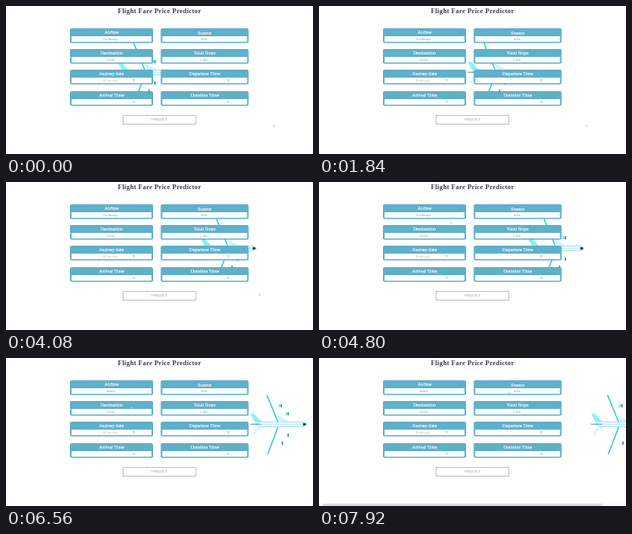
An HTML page for the animation above (8 s loop, 384 by 186 pixels).

```html
<!DOCTYPE html>
<html lang="en">
<head>
<meta charset="utf-8">
<title>Flight Fare Price Predictor</title>
<style>
  html, body { margin: 0; width: 100%; height: 100%; overflow: hidden; background: #fff; }
  svg { display: block; width: 384px; height: 186px; }
  text { text-anchor: middle; }
  .title { font: bold 8.2px "Liberation Serif", serif; letter-spacing: .36px; fill: #343b42; }
  .label { font: 6.1px "Liberation Serif", serif; fill: #fff; stroke: #fff; stroke-width: .15px; }
  .value { font: 3.3px "Liberation Sans", sans-serif; fill: #999; }
  .button { font: 4.4px "Liberation Sans", sans-serif; letter-spacing: .15px; fill: #9a9a9a; }
  .icon { fill: none; stroke: #aaa; stroke-width: .45px; }
</style>
</head>
<body>
<svg viewBox="0 0 384 186">
  <rect width="384" height="186" fill="#fff"/>
  <g id="plane">
    <path d="M34 72.5L48 79.5H37Z" fill="#c4f8fc"/>
    <path d="M0.5 70H4.4L14.5 80.5H5.5Z" fill="#84f2fb"/>
    <path d="M2.2 97H4L14 86.5H8Z" fill="#d2fafd"/>
    <g fill="none" stroke="#2cdcec" stroke-width="1.3">
      <path d="M20.8 46.5L34.6 80M21.8 121L34.6 87"/>
      <path d="M20.4 46.5L34.2 80M21.4 121L34.2 87" stroke="#1f9fae" stroke-width=".5"/>
    </g>
    <path d="M6 83L11 80.2H62Q69 80.6 71 83.2Q69 86 62 86.4H12Z" fill="#effcfe" stroke="#72d3dd" stroke-width=".7"/>
    <path d="M0 83.2H14" stroke="#34889a" stroke-width=".9"/>
    <path d="M14 83.2H65" stroke="#a4d3da" stroke-width=".6"/>
    <path d="M66 81.5L69.5 82.4V84.3L66 85.2Z" fill="#17333b"/>
    <g id="engines"></g>
  </g>
  <text class="title" x="192.2" y="9">Flight Fare Price Predictor</text>
  <g id="cards"></g>
  <rect x="146.5" y="137.5" width="91" height="11" fill="#fff" stroke="#a9b5bb" stroke-width=".8"/>
  <text class="button" x="192" y="144.3">PREDICT</text>
  <g id="bar">
    <rect y="182.5" width="384" height="3.5" fill="#fafafa"/>
    <rect id="thumb" x="5" y="183" height="3" fill="#dadada"/>
  </g>
  <path id="cursor" d="M0 0V2.6L.7 2L1.2 3L1.7 2.8L1.2 1.8H2Z" fill="#fff" stroke="#888" stroke-width=".25"/>
</svg>
<script>
const NS = "http://www.w3.org/2000/svg";
const LOOP = 8000, STEP = 80;
const $ = id => document.getElementById(id);

function add(parent, tag, attrs, text = "") {
  const el = document.createElementNS(NS, tag);
  for (const key in attrs) el.setAttribute(key, attrs[key]);
  el.textContent = text;
  parent.append(el);
  return el;
}

function card(col, row, label, value, kind) {
  const x = col ? 193.5 : 80, w = col ? 110 : 104;
  const y = Math.floor(28 + row * 26.4), mid = x + w / 2;
  const g = $("cards");
  add(g, "rect", { x, y, width: w, height: 18.5, rx: 2, fill: "#60b0c9" });
  add(g, "rect", { x: x + 2, y: y + 10, width: w - 4, height: 7, fill: "#fff" });
  add(g, "text", { class: "label", x: mid, y: y + (col && !row ? 7.8 : 7.3) }, label);
  if (kind === "select") {
    add(g, "path", { class: "icon", d: `M${x + w - 4.4} ${y + 13}l.8 .8l.8 -.8` });
  } else {
    const ix = mid + (col ? 29 : 27);
    add(g, "rect", { class: "icon", x: ix, y: y + 12.4, width: 1.6, height: 2 });
  }
  return add(g, "text", { class: "value", x: mid - (kind === "date" ? 2 : 1), y: y + 14.6 }, value);
}

const airline = card(0, 0, "Airline", "Fen Airways", "select");
card(1, 0, "Source", "Delhi", "select");
card(0, 1, "Destination", "Cochin", "select");
card(1, 1, "Total Stops", "1 Stop", "select");
card(0, 2, "Journey date", "dd-mm-yyyy", "date").setAttribute("opacity", .65);
card(1, 2, "Departure Time", "", "time");
card(0, 3, "Arrival Time", "", "time");
card(1, 3, "Duration Time", "", "time");

for (const [x, y, w] of [[35, 58, 4.5], [44, 68, 4], [39, 105, 1.7], [46, 95, 2]]) {
  add($("engines"), "rect", { x, y, width: w, height: 4, fill: "#8fe9f2" });
  add($("engines"), "rect", { x: x + w - 1.2, y, width: 1.2, height: 4, fill: "#297785" });
}

// Pointer stops: time, x, y
const stops = [
  [0, 334, 149], [3760, 334, 149], [4080, 316.5, 140], [4960, 150, 41],
  [5200, 150, 41], [5440, 150, 52], [6000, 156.5, 61], [6640, 156.5, 61],
  [7760, 237, 42], [8000, 237, 42]
];

function pointer(t) {
  const i = stops.findIndex(s => s[0] > t);
  const [t0, x0, y0] = stops[i - 1], [t1, x1, y1] = stops[i];
  const p = (t - t0) / (t1 - t0), e = p * p * (3 - 2 * p);
  return [x0 + (x1 - x0) * e, y0 + (y1 - y0) * e];
}

function draw(t) {
  const tail = 139 + t * .0254, nose = tail + 71;
  $("plane").setAttribute("transform", `translate(${tail})`);
  $("cursor").setAttribute("transform", `translate(${pointer(t)})`);
  airline.textContent = t < 6080 ? "Fen Airways" : "Nimbro";
  $("bar").style.display = nose > 384 ? "" : "none";
  $("thumb").setAttribute("width", 374 * 384 / Math.max(384, nose));
}

function tick(now) {
  draw(Math.floor((now % LOOP) / STEP) * STEP);
  requestAnimationFrame(tick);
}
draw(0);
requestAnimationFrame(tick);
</script>
</body>
</html>
```
